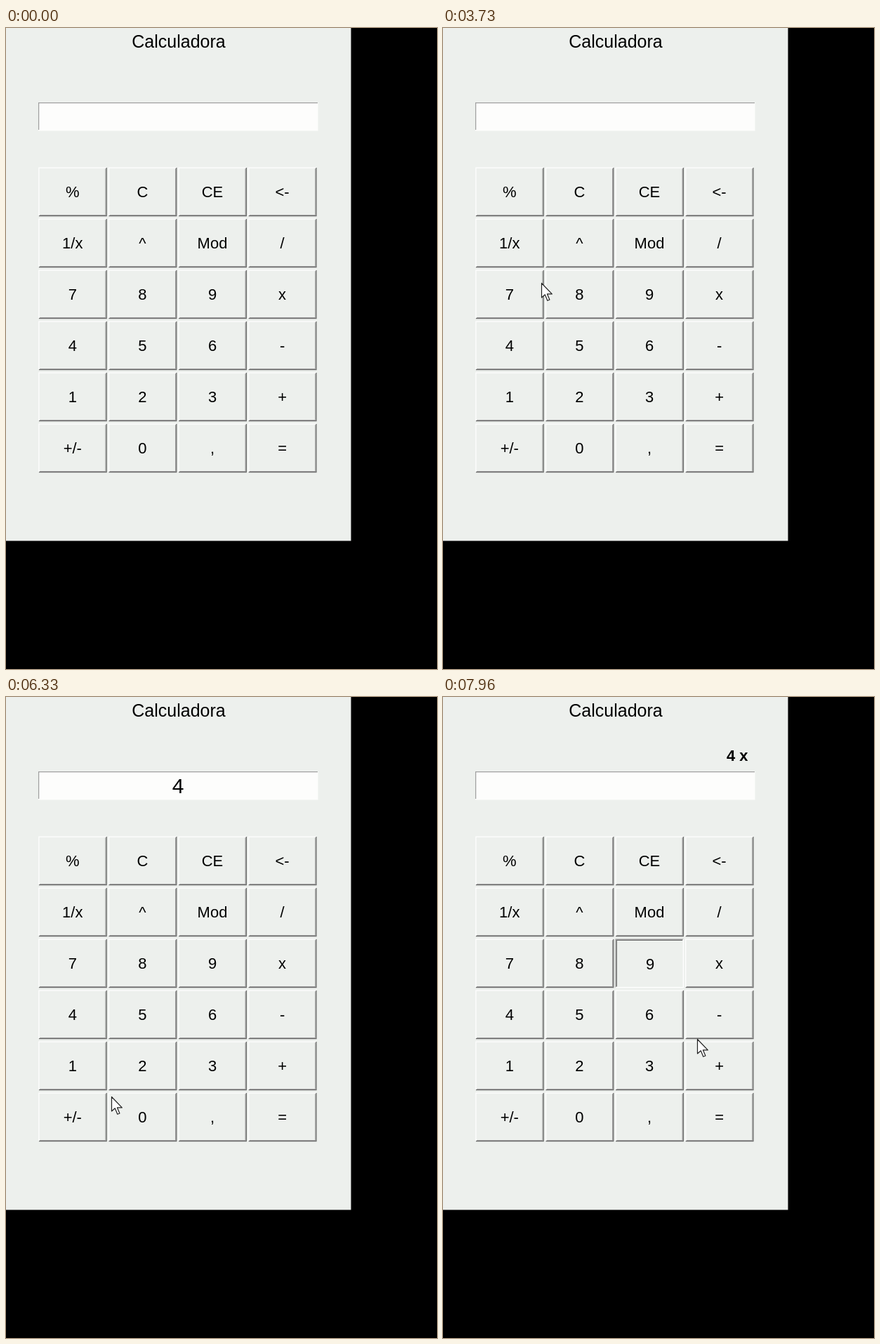
Animation of 614x913 px, one loop 8000 ms. Source, as an HTML page:

```html
<!DOCTYPE html>
<html lang="es">
<head>
<meta charset="utf-8">
<title>Calculadora</title>
<style>
  html, body { margin: 0; width: 100%; height: 100%; overflow: hidden; background: #000; }
  svg { display: block; }
  text { font: 22px "Liberation Sans", Arial, sans-serif; text-anchor: middle; }
  .title { font-size: 25px; }
  .entry { font-size: 30px; }
  .history { font-weight: bold; text-anchor: end; }
  .light { stroke: #fff; }
  .shade { stroke: #a0a0a0; }
  .dark { stroke: #696969; }
  .light, .shade, .dark { fill: none; stroke-width: 1.25; }
  .sunken, .pressed .raised { display: none; }
  .pressed .sunken { display: inline; }
  .pressed text { transform: translate(1px, 1px); }
</style>
</head>
<body>
<svg width="614" height="913" viewBox="0 0 614 913">
  <rect width="491.5" height="730.5" fill="#edf0ed"/>
  <text class="title" x="246" y="27.6">Calculadora</text>
  <text class="history" id="history" x="434.5" y="90.6"></text>
  <rect x="46" y="106" width="398.5" height="40.5" fill="#fdfdfc"/>
  <path class="shade" d="M46.6 145V106.6H444"/>
  <text class="entry" id="entry" x="245" y="136.6"></text>
  <g id="keys"></g>
  <path id="cursor" d="M0 0V20.5L4.8 16.3 8.3 24.8 11.4 23.5 8 15.4H14.8Z"
    fill="#fff" stroke="#222" stroke-width="1.2" stroke-linejoin="round"/>
</svg>
<script>
const LOOP = 8000, WIDTH = 97.5, HEIGHT = 69.8;
const LABELS = '% C CE <- 1/x ^ Mod / 7 8 9 x 4 5 6 - 1 2 3 + +/- 0 , ='.split(' ');
const byId = id => document.getElementById(id);
const entry = byId('entry'), past = byId('history'), cursor = byId('cursor');

// Half of a key's bevel: the top-left or the bottom-right corner line.
function edge(tone, corner, inset) {
  const right = WIDTH - inset, bottom = HEIGHT - inset;
  const bend = corner === 'top' ? `V${inset}H${right}` : `H${right}V${inset}`;
  return `<path class="${tone}" d="M${inset} ${bottom}${bend}"/>`;
}

const RAISED = edge('light', 'top', .6) + edge('shade', 'bottom', 1.8) + edge('dark', 'bottom', .6);
const SUNKEN = edge('shade', 'top', .6) + edge('dark', 'top', 1.8) + edge('light', 'bottom', .6);

byId('keys').innerHTML = LABELS.map((label, i) => `
  <g transform="translate(${46.3 + 99.6 * (i % 4)} ${198.5 + 73 * Math.floor(i / 4)})">
    <g class="raised">${RAISED}</g><g class="sunken">${SUNKEN}</g>
    <text x="48.5" y="42">${label.replace('<', '&lt;')}</text>
  </g>`).join('');
const keys = [...byId('keys').children];

// Stops of the pointer (time, x, y); it is out of sight between the two strokes.
const STROKES = [
  [[3730, 140, 363], [4750, 248, 457]],
  [[5360, 232, 430], [5640, 24, 674], [6060, 148, 572], [6330, 150, 569],
   [6960, 439, 495], [7200, 477, 480], [7960, 362, 487], [LOOP, 362, 487]]
];
const PRESSES = [
  { label: '4', down: 6100, up: 6210 },
  { label: 'x', down: 7200, up: 7310 },
  { label: '9', down: 7910, up: LOOP }
];

const ease = k => k * k * (3 - 2 * k);

function pointerAt(t) {
  const stroke = STROKES.find(s => t >= s[0][0] && t < s.at(-1)[0]);
  if (!stroke) return null;
  const next = stroke.findIndex(stop => stop[0] > t);
  const [t0, x0, y0] = stroke[next - 1], [t1, x1, y1] = stroke[next];
  const k = ease((t - t0) / (t1 - t0));
  return [x0 + (x1 - x0) * k, y0 + (y1 - y0) * k];
}

function draw(t) {
  const at = pointerAt(t);
  cursor.style.display = at ? '' : 'none';
  if (at) cursor.setAttribute('transform', `translate(${at[0] + .5} ${at[1] + .5})`);
  for (const { label, down, up } of PRESSES)
    keys[LABELS.indexOf(label)].classList.toggle('pressed', t >= down && t < up);
  const [four, times] = PRESSES;
  entry.textContent = t >= four.up && t < times.up ? '4' : '';
  past.textContent = t >= times.up ? '4 x' : '';
}

const start = performance.now();
function tick() {
  draw((performance.now() - start) % LOOP);
  requestAnimationFrame(tick);
}
tick();
</script>
</body>
</html>
```
